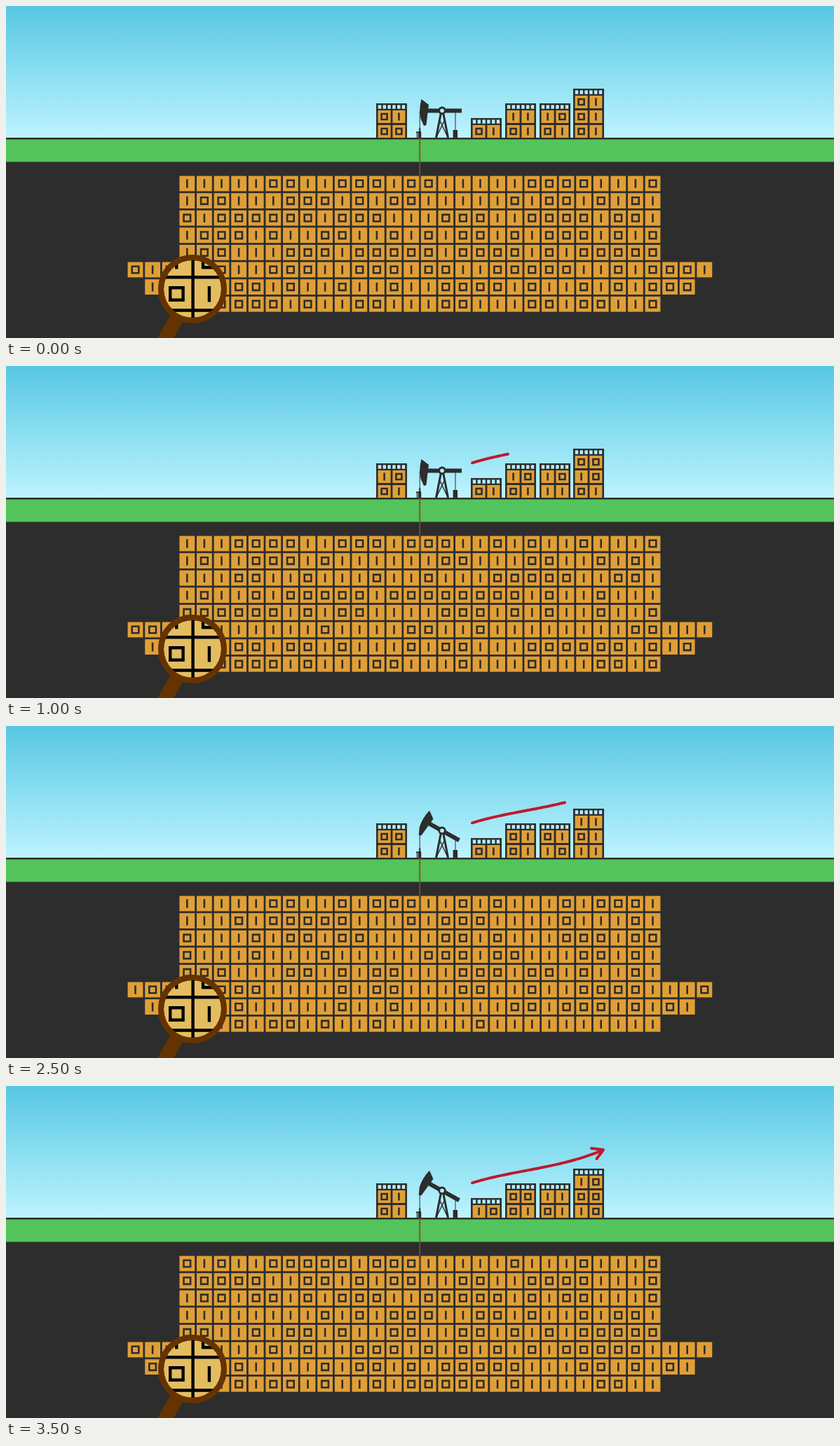
These frames come from a looping animation (1181x474 px, 4.2 s). An HTML page:

```html
<!DOCTYPE html>
<html lang="en">
<head>
<meta charset="utf-8">
<title>Data pump</title>
<style>
  html, body { margin: 0; width: 100%; height: 100%; overflow: hidden; background: #2d2d2d; }
  svg { display: block; width: 100%; height: 100%; }
  .dark { fill: #2d2d2d; }
  .ink { fill: none; stroke: #2d2d2d; }
  .cell { fill: #e09f36; }
  .pane { fill: #b4effc; }
  .trend { fill: none; stroke: #be1a2b; stroke-width: 4; stroke-linecap: round; stroke-linejoin: round; }
</style>
</head>
<body>
<svg viewBox="0 0 1181 474">
  <defs>
    <linearGradient id="sky" x1="0" y1="0" x2="0" y2="1">
      <stop offset="0" stop-color="#56c7e2"/>
      <stop offset="1" stop-color="#bef4ff"/>
    </linearGradient>
    <clipPath id="glass"><circle cx="266" cy="404" r="42"/></clipPath>
  </defs>
  <rect class="dark" width="1181" height="474"/>
  <rect width="1181" height="189" fill="url(#sky)"/>
  <rect class="dark" y="188" width="1181" height="3"/>
  <rect y="190.5" width="1181" height="32" fill="#53c45b"/>

  <g id="cells"></g>
  <path id="marks" class="ink" stroke-width="2.6"/>

  <path d="M590.2 189V223" stroke="#8a5a2a" stroke-width="2.2"/>
  <path d="M590.2 222V265" stroke="#9a6a2c" stroke-width="1"/>

  <path id="cables" class="ink" stroke-width="1"/>
  <g class="ink">
    <path d="M620.5 152L613.5 188M623.5 152L630.5 188" stroke-width="3"/>
    <path d="M619 164L630 187M625 164L614 187" stroke-width="1.5"/>
    <path d="M586.5 179V189M585 180.5H592" stroke-width="1.4"/>
  </g>
  <path class="dark" d="M588 179h1.2v-5h2v5h1v10h-4.2zM637.6 177h6.4v12h-6.4z"/>
  <path id="beam" class="dark" d="M592.5 133L603 141L602.3 146.5H650V152.5H601.5L599.5 170L596 171L591.5 161Q588.5 147 592.5 133Z"/>
  <circle cx="622" cy="149.3" r="4.3" fill="#b4effc" stroke="#2d2d2d" stroke-width="2.8"/>

  <path id="curve" class="trend"/>
  <path id="tip" class="trend" d="M835 89L852 91L842.5 104"/>

  <path d="M235 440L253 449L239 474H216Z" fill="#663300"/>
  <circle cx="266" cy="404" r="48" fill="#663300"/>
  <circle cx="266" cy="404" r="41" fill="#e3bd60"/>
  <g clip-path="url(#glass)" fill="none" stroke="#000" stroke-width="4.4">
    <path d="M266.6 360V450M220 387.3H312M220 434.5H312"/>
    <path d="M234.2 402.2H252.6V419.8H234.2ZM289.9 400V422.5M243.2 354V375.5M281 354V373.3H302"/>
  </g>
  <circle cx="266" cy="404" r="45" fill="none" stroke="#663300" stroke-width="8"/>
</svg>
<script>
const LOOP = 4200, BEAT = 500, LAST = 7;
const PITCH = 24.6, SIZE = 21.8;
const $ = id => document.getElementById(id);

// left edge and number of storeys
const towers = [[528, 2], [663, 1], [712, 2], [761, 2], [809, 3]];

// digits shown on the towers, top storey first
const towerBits = [
  '01000111011001010101', '01010100100001100011',
  '10010110011011001001', '00011101000001010001',
  '10111010101001001010', '00010101010110110111',
  '01100110100110011100', '01011000011101100010'
];

// seed and share of ones in the deposit; one state comes back at the end
const deposits = [[11, .43], [23, .5], [37, .5], [41, .52], [59, .58], [67, .6], [73, .5], [41, .52]];

function random(seed) {
  let s = seed * 7919;
  return () => {
    s = (s + 0x6D2B79F5) | 0;
    let t = Math.imul(s ^ s >>> 15, 1 | s);
    t = t + Math.imul(t ^ t >>> 7, 61 | t) ^ t;
    return ((t ^ t >>> 14) >>> 0) / 4294967296;
  };
}

const rect = (cls, x, y, w, h) =>
  `<rect class="${cls}" x="${x}" y="${y}" width="${w}" height="${h}"/>`;

const under = [], above = [];
let shapes = '';

for (let row = 0; row < 8; row++) {
  const extra = row === 5 ? 3 : row === 6 ? 2 : 0;
  for (let col = -extra; col < 28 + extra; col++) {
    const x = 258.3 + col * PITCH, y = 253.5 + row * PITCH;
    under.push([x, y]);
    shapes += rect('cell', x - SIZE / 2, y - SIZE / 2, SIZE, SIZE);
  }
}

for (const [x, floors] of towers) {
  const top = 181 - floors * 21;
  shapes += rect('dark', x, top, 44, 189 - top);
  for (let i = 0; i < 6; i++) shapes += rect('pane', x + 2.8 + i * 6.8, top + 2.4, 4.4, 5.4);
  for (let f = 0; f < floors; f++) {
    for (const dx of [11.6, 32.4]) {
      const y = top + 19 + f * 21;
      above.push([x + dx, y]);
      shapes += rect('cell', x + dx - 9, y - 9, 18, 18);
    }
  }
}
$('cells').innerHTML = shapes;

function mark([x, y], one, r) {
  return one ? `M${x} ${y - r - 1.5}v${2 * r + 3}`
             : `M${x - r} ${y - r}h${2 * r}v${2 * r}h${-2 * r}z`;
}

function trend(step) {
  if (!step) return '';
  const end = (27 * step - 3) / 186;
  const points = [];
  for (let i = 0; i <= 40; i++) {
    const t = end * i / 40, u = 1 - t;
    const y = 138.3 * u ** 3 + 357.9 * t * u * u + 353.7 * t * t * u + 91.5 * t ** 3;
    points.push(`${665 + 186 * t} ${y}`);
  }
  return 'M' + points.join('L');
}

function draw(step) {
  const [seed, share] = deposits[step];
  const next = random(seed);
  $('marks').setAttribute('d',
    under.map(p => mark(p, next() < share, 4.8)).join('') +
    above.map((p, i) => mark(p, towerBits[step][i] === '1', 4)).join(''));

  const raised = step % 2;
  $('beam').setAttribute('transform', `rotate(${raised ? 29 : 0} 622 149.3)`);
  $('cables').setAttribute('d', `M590.2 ${raised ? 152 : 150}V180M641 ${raised ? 160 : 151}V178`);
  $('curve').setAttribute('d', trend(step));
  $('tip').style.display = step === LAST ? '' : 'none';
}

let shown = -1;
const start = performance.now();
function tick(now) {
  const time = Math.max(0, now - start) % LOOP;
  const step = Math.min(LAST, Math.floor(time / BEAT));
  if (step !== shown) draw(shown = step);
  requestAnimationFrame(tick);
}
tick(start);
</script>
</body>
</html>
```
